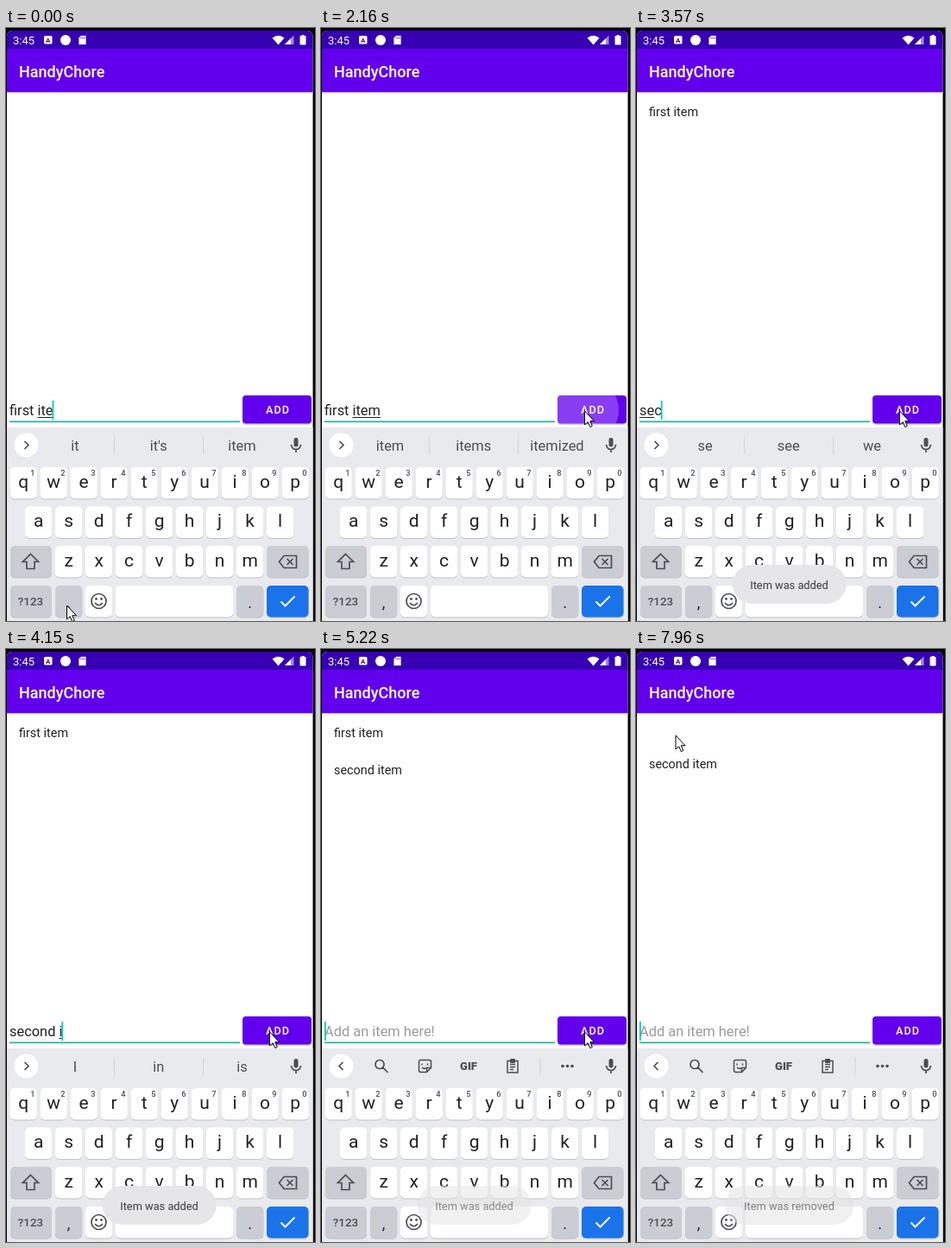
These frames come from a looping animation (358 px wide and 686 px high, 8000 ms). An HTML page with a canvas:

```html
<!DOCTYPE html>
<html lang="en">
<head>
<meta charset="utf-8">
<title>To-do list</title>
<style>
html, body { margin: 0; width: 100%; height: 100%; overflow: hidden; background: #000; }
canvas { display: block; }
</style>
</head>
<body>
<canvas id="stage" width="358" height="686"></canvas>
<script>
const ctx = document.getElementById('stage').getContext('2d');
const LOOP = 8000;
const INK = '#202124', GREY = '#4b4e52', KEY = '#cacdd4', PANEL = '#e8eaed', PURPLE = '#6200ee';

// The screen refreshes only at these moments.
const TICKS = [0, 150, 310, 890, 1300, 1440, 1590, 1730, 1870, 2160, 2310, 2460, 2590, 2730,
  3290, 3430, 3570, 3700, 3840, 4000, 4150, 4430, 4570, 4700, 4950, 5090, 5220, 5360, 5490, 5630,
  5910, 6030, 6460, 6590, 6720, 6850, 6990, 7130, 7270, 7400, 7820, 7960];
const BLINKS = [890, 1440, 1870, 2310, 2730, 3290, 5490, 6030, 6460, 6990, 7400, 7960];

// time, field text, underlined word, suggestions (none: toolbar)
const TYPING = [
  [0, 'first ite', 'ite', "it it's item"],
  [150, 'first item', 'ite', "it it's item"],
  [310, 'first item', 'item', 'item items itemized'],
  [2310, '', '', 'item items itemized'],
  [2460, '', '', ''],
  [3290, 's', '', ''],
  [3430, 'se', 's', 's so see'],
  [3570, 'sec', 'se', 'se see we'],
  [3700, 'seco', 'sec', 'sec second secs'],
  [3840, 'second', 'secon', 'second seconds secondary'],
  [4000, 'second ', '', 'time one to'],
  [4150, 'second i', 'i', 'I in is'],
  [4430, 'second ite', 'ite', "it it's item"],
  [4570, 'second item', 'item', 'item items itemized'],
  [5090, '', '', 'item items itemized'],
  [5220, '', '', '']
];
const POINTER = [[0, 70.5, 668], [1230, 70.5, 668], [1730, 305.5, 443], [5430, 305.5, 443],
  [5630, 54, -7], [5850, 54, -7], [6030, 49.5, 107], [6590, 49.5, 107], [6990, 46, 100], [LOOP, 46, 100]];
const TAPS = [2160, 4950];
// shown at, gone at, message, width
const TOASTS = [[2310, 4650, 'Item was added', 132], [5090, 7400, 'Item was added', 132],
  [7820, 9900, 'Item was removed', 149]];

const clamp = v => Math.max(0, Math.min(1, v));
const lastBefore = (list, t) => list.filter(e => e[0] <= t).pop();

function box(x, y, w, h, r, color) {
  ctx.fillStyle = color;
  ctx.beginPath();
  ctx.roundRect(x, y, w, h, r);
  ctx.fill();
}
function disc(x, y, r, color) { box(x - r, y - r, 2 * r, 2 * r, r, color); }
function font(size, weight = 400) { ctx.font = `${weight} ${size}px Roboto, sans-serif`; }
function text(s, x, y, size, color, align = 'left', weight = 400) {
  font(size, weight);
  ctx.fillStyle = color;
  ctx.textAlign = align;
  ctx.fillText(s, x, y);
}
function icon(path, x, y, { fill, stroke, width = 1.7 }) {
  const shape = new Path2D(path);
  ctx.save();
  ctx.translate(x, y);
  if (fill) { ctx.fillStyle = fill; ctx.fill(shape); }
  if (stroke) { ctx.strokeStyle = stroke; ctx.lineWidth = width; ctx.stroke(shape); }
  ctx.restore();
}
function key(x, y, w, color = '#fff') {
  box(x, y + 1, w, 36.5, 5, '#bfc2c7');
  box(x, y, w, 36.5, 5, color);
}

function drawBars() {
  box(0, 0, 358, 686, 0, '#000');
  box(1, 3, 354.5, 690, [6, 6, 0, 0], '#fff');
  box(1, 3, 354.5, 22, [6, 6, 0, 0], '#3700b3');
  box(1, 24, 354.5, 50.5, 0, PURPLE);
  box(1, 74.5, 354.5, 1, 0, '#e4e0ea');
  text('3:45', 8, 18.5, 13, '#fff');
  box(44, 9, 9.5, 9.5, 1.5, '#fff');
  text('A', 48.8, 16.7, 8, '#3700b3', 'center', 700);
  disc(69, 14, 6, '#fff');
  icon('M3 0H9V11H0V3ZM3 2V4M5 2V4M7 2V4', 84, 8.5, { fill: '#fff', stroke: '#3700b3', width: .8 });
  icon('M0 2.5Q7 -3 14 2.5L7 10.5Z', 308.5, 9, { fill: '#fff' });
  icon('M0 10.5L10.5 0V10.5Z', 323, 8.5, { fill: '#9f86dc' });
  icon('M0 10.5L7 3.5V10.5Z', 323, 8.5, { fill: '#fff' });
  box(340.5, 9, 7, 10.5, 1, '#fff');
  box(342.5, 8, 3, 2, 0, '#fff');
  text('HandyChore', 15, 57, 18, '#fff', 'left', 500);
}

function drawList(t) {
  const removal = clamp((t - 7740) / 130);
  if (t >= 2310 && removal < 1) {
    ctx.globalAlpha = 1 - removal;
    text('first item', 15, 102, 14.4, INK);
    ctx.globalAlpha = 1;
  }
  if (t >= 5090) text('second item', 15, 145 - 7 * clamp((t - 7820) / 140), 14.4, INK);
}

function drawField(t, [, value, composing]) {
  if (value) text(value, 4, 448, 16.4, INK);
  else text('Add an item here!', 4, 448, 16.4, '#9b9b9b');
  font(16.4);
  const widthOf = s => ctx.measureText(s).width;
  if (composing) {
    const start = widthOf(value.slice(0, value.lastIndexOf(' ') + 1));
    box(4 + start, 450, widthOf(composing), 1, 0, INK);
  }
  box(4, 454.5, 267, 1.7, 0, '#25b3a2');
  if (BLINKS.filter(b => b <= t).length % 2 === 0)
    box(value ? 3 + widthOf(value) : 4, 431, 1.8, 22, 0, '#03cdb9');
}

function drawButton(t) {
  box(274, 426, 80, 33, 4, '#c9c5d2');
  box(274, 425, 80, 32.5, 4, PURPLE);
  for (const tap of TAPS) {
    const age = t - tap;
    if (age < 0 || age >= 270) continue;
    ctx.save();
    ctx.beginPath();
    ctx.roundRect(274, 425, 80, 32.5, 4);
    ctx.clip();
    disc(308, 442, 37 + age * .5, `rgba(255,255,255,${.24 * (1 - age / 270)})`);
    ctx.restore();
  }
  ctx.letterSpacing = '1.1px';
  text('ADD', 315, 446, 12.6, '#fff', 'center', 500);
  ctx.letterSpacing = '0px';
}

function drawStrip(words) {
  const line = { stroke: GREY };
  const divider = x => box(x, 472.5, 1, 21, 0, '#d0d3d7');
  disc(23.5, 482.5, 14, '#fff');
  icon(words ? 'M-2 -4.5L2.5 0L-2 4.5' : 'M2 -4.5L-2.5 0L2 4.5', 23.5, 482.5, line);
  if (words) {
    words.split(' ').forEach((w, i) => text(w, 80 + i * 96.7, 489, 16.4, GREY, 'center'));
    divider(125);
    divider(228);
  } else {
    icon('M3 -2A5 5 0 1 1 -7 -2A5 5 0 1 1 3 -2M1.7 1.7L7.5 7.5', 70, 482.5, line);
    icon('M-5 -7H5Q7 -7 7 -5V2L2 7H-5Q-7 7 -7 5V-5Q-7 -7 -5 -7ZM7 2H2V7M-3.5 -3V-1M3 -3V-1M-3.5 1.5Q-1 4 2 2', 120.5, 482.5, { ...line, width: 1.5 });
    text('GIF', 171, 487, 13, GREY, 'center', 900);
    icon('M-6 -6H6V7.5H-6ZM-3 -2H3M-3 1H3M-3 4H1', 222, 482.5, { ...line, width: 1.5 });
    box(219, 474, 6, 5, 1, GREY);
    divider(253.5);
    for (const x of [280, 285.5, 291]) disc(x, 482.5, 1.8, GREY);
  }
  box(333.5, 474, 5, 10.5, 2.5, GREY);
  icon('M-5.5 0A5.5 5.5 0 0 0 5.5 0M0 5.5V9', 336, 482, line);
}

function drawKeys() {
  const rows = [['qwertyuiop', 4.5, 508], ['asdfghjkl', 22, 553.5], ['zxcvbnm', 57, 599]];
  for (const [letters, left, y] of rows) {
    [...letters].forEach((c, i) => {
      const x = left + i * 35;
      key(x, y, 31.3);
      text(c, x + 15.6, y + 23.7, 21, INK, 'center');
      if (y === 508) text((i + 1) % 10, x + 26.5, y + 10, 9.3, GREY, 'center', 500);
    });
  }
  key(5, 599, 48, KEY);
  icon('M0 -9L9 0H4.5V8H-4.5V0H-9Z', 28.5, 617.5, { stroke: GREY });
  key(302, 599, 48.5, KEY);
  icon('M-4.5 -7H10V7H-4.5L-10 0ZM-1 -3.5L6 3.5M6 -3.5L-1 3.5', 326.5, 617.5, { stroke: GREY });

  key(5, 645, 48, KEY);
  text('?123', 28.5, 668, 13.4, GREY, 'center', 500);
  key(57, 645, 31.3, KEY);
  text(',', 72.5, 671, 18, INK, 'center');
  key(92, 645, 31.3);
  icon('M8.5 0A8.5 8.5 0 1 1 -8.5 0A8.5 8.5 0 1 1 8.5 0M-4.5 2Q0 7.5 4.5 2', 107.5, 663, { stroke: GREY });
  disc(104.5, 660.5, 1.4, GREY);
  disc(110.5, 660.5, 1.4, GREY);
  key(127, 645, 136);
  key(267, 645, 31.3, KEY);
  text('.', 282.5, 671, 18, INK, 'center');
  key(302, 645, 48.5, '#1a73e8');
  icon('M-8 0L-3 5L8 -6', 326.5, 663.5, { stroke: '#fff', width: 2 });
}

function drawToast(t) {
  for (const [start, end, message, width] of TOASTS) {
    const alpha = Math.min(clamp((t - start) / 230), clamp((end - t) / 300));
    if (!alpha) continue;
    ctx.globalAlpha = alpha;
    box(177.7 - width / 2, 621, width, 45, 22.5, '#e6e6e8');
    text(message, 177.5, 649, 12.8, '#3c3c3e', 'center');
    ctx.globalAlpha = 1;
  }
}

function drawPointer(t) {
  const next = POINTER.findIndex(p => p[0] > t);
  const [t0, x0, y0] = POINTER[next - 1], [t1, x1, y1] = POINTER[next];
  const u = (t - t0) / (t1 - t0), ease = u * u * (3 - 2 * u);
  icon('M0 0V16L3.7 12.7L6.3 18.6L8.8 17.5L6.3 11.7H11Z', x0 + (x1 - x0) * ease, y0 + (y1 - y0) * ease,
    { fill: '#fff', stroke: '#000', width: 1 });
}

function draw(now) {
  const time = now % LOOP;
  const t = TICKS.filter(tick => tick <= time).pop();
  const typed = lastBefore(TYPING, t);
  drawBars();
  drawList(t);
  drawField(t, typed);
  drawButton(t);
  box(1, 462, 354.5, 224, 0, PANEL);
  drawStrip(typed[3]);
  drawKeys();
  drawToast(t);
  drawPointer(t);
}

let begin;
function frame(now) {
  begin ??= now;
  draw(now - begin);
  requestAnimationFrame(frame);
}
requestAnimationFrame(frame);
</script>
</body>
</html>
```
